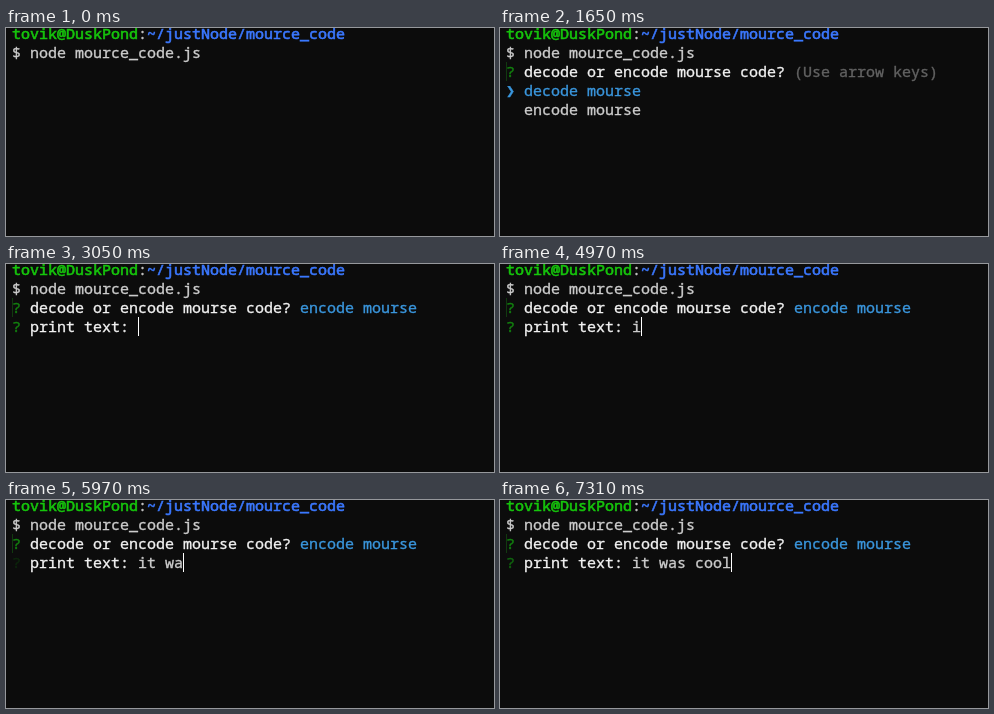
Recreate the animation shown at these times as an HTML page. Size 488 by 208 pixels, loop 8 s.

```html
<!DOCTYPE html>
<html lang="en">
<head>
<meta charset="utf-8">
<title>Terminal session</title>
<style>
  html, body { margin: 0; width: 100%; height: 100%; overflow: hidden; background: #0c0c0c; }

  /* Character grid: 9 x 19 px cells, first column at x = 6, first row at y = -4 */
  .term {
    position: relative; width: 488px; height: 208px; overflow: hidden;
    font: 400 15px/19px "Noto Sans Mono", "DejaVu Sans Mono", monospace;
    font-variant-ligatures: none; color: #ccc;
    -webkit-text-stroke: .35px; /* semi-bold look */
  }
  .term span {
    position: absolute; white-space: pre;
    left: calc(6px + 9px * var(--c, 0)); top: calc(-4px + 19px * var(--r, 0));
  }
  .term i { position: absolute; width: 1px; height: 19px; }
  .term b { font-weight: 400; -webkit-text-stroke-width: .6px; }
  .user { color: #16c60c; }
  .path { color: #3b78ff; }
  .mark { color: #13820f; }
  .ask { color: #f2f2f2; }
  .hint { color: #626262; }
  .pick { color: #3a96dd; }

  .anim { animation: 8s step-end infinite; }
  .question { animation-name: question; }
  .first { animation-name: first; }
  .second { animation-name: second; }
  .reply { animation-name: reply; }
  .blink { animation-name: reply, flicker; animation-duration: 8s; }
  .typed { overflow: hidden; width: 0; animation-name: type; }
  .caret { background: #fff; animation-name: caret; }
  .trace { left: 6px; top: 34px; background: #123a10; animation-name: trace; }
  .pointer { position: absolute; left: 0; top: 0; animation-name: pointer; }

  @keyframes question {
    0% { visibility: hidden; } 20.625% { visibility: visible; }
    33.875% { visibility: hidden; } 34.625%, 100% { visibility: visible; }
  }
  @keyframes first {
    0% { visibility: hidden; } 20.625% { visibility: visible; } 33.875%, 100% { visibility: hidden; }
  }
  @keyframes second {
    0% { visibility: hidden; } 34.625% { visibility: visible; } 38.125%, 100% { visibility: hidden; }
  }
  @keyframes reply {
    0% { visibility: hidden; } 38.125%, 100% { visibility: visible; }
  }
  @keyframes trace {
    0% { visibility: hidden; } 20.625%, 100% { visibility: visible; }
  }
  @keyframes flicker {
    0%, 65.5%, 68%, 73%, 76.25% { color: #13820f; }
    64.625%, 67.125%, 72.125%, 74.625%, 90.375% { color: #0d260c; }
    91.375%, 100% { color: #10660f; }
  }
  @keyframes type {
    0% { width: 0; }
    62.125% { width: 9px; }
    64.625% { width: 18px; }
    67.125% { width: 27px; }
    72.125% { width: 36px; }
    74.625% { width: 45px; }
    76.25% { width: 54px; }
    79.625% { width: 63px; }
    82.875% { width: 72px; }
    86.25% { width: 81px; }
    87.875% { width: 90px; }
    90.375%, 100% { width: 99px; }
  }
  @keyframes caret {
    0% { left: 204px; top: 15px; visibility: hidden; }
    6% { left: 204px; top: 15px; visibility: visible; }
    15.75% { left: 6px; top: 34px; visibility: visible; }
    20.625% { left: 6px; top: 34px; visibility: hidden; }
    38.125% { left: 132px; top: 53px; visibility: visible; }
    62.125% { left: 141px; top: 53px; }
    64.625% { left: 150px; top: 53px; }
    67.125% { left: 159px; top: 53px; }
    72.125% { left: 168px; top: 53px; }
    74.625% { left: 177px; top: 53px; }
    76.25% { left: 186px; top: 53px; }
    79.625% { left: 195px; top: 53px; }
    82.875% { left: 204px; top: 53px; }
    86.25% { left: 213px; top: 53px; }
    87.875% { left: 222px; top: 53px; }
    90.375%, 100% { left: 231px; top: 53px; visibility: visible; }
  }
  @keyframes pointer {
    0% { transform: translate(424px, 189px); visibility: hidden; }
    .875% { transform: translate(424px, 189px); visibility: visible; }
    1.75% { transform: translate(416px, 160px); }
    2.5% { transform: translate(410px, 140px); }
    3.375% { transform: translate(408px, 132px); visibility: visible; }
    16.5%, 100% { transform: translate(408px, 132px); visibility: hidden; }
  }
</style>
</head>
<body>
<div class="term">
  <span><b class="user">tovik@DuskPond</b>:<b class="path">~/justNode/mource_code</b></span>
  <span style="--r:1">$ node mource_code.js</span>

  <span class="mark anim question" style="--r:2">?</span>
  <span class="ask anim question" style="--r:2;--c:2">decode or encode mourse code?</span>
  <span class="hint anim first" style="--r:2;--c:32">(Use arrow keys)</span>
  <span class="pick anim reply" style="--r:2;--c:32">encode mourse</span>

  <span class="pick anim first" style="--r:3">❯</span>
  <span class="pick anim first" style="--r:3;--c:2">decode mourse</span>
  <span class="anim first" style="--r:4;--c:2">encode mourse</span>

  <span class="anim second" style="--r:3;--c:2">decode mourse</span>
  <span class="pick anim second" style="--r:4">❯</span>
  <span class="pick anim second" style="--r:4;--c:2">encode mourse</span>

  <span class="mark anim blink" style="--r:3">?</span>
  <span class="ask anim reply" style="--r:3;--c:2">print text:</span>
  <span class="anim typed" style="--r:3;--c:14">it was cool</span>

  <i class="anim trace"></i>
  <i class="anim caret"></i>
  <svg class="anim pointer" width="10" height="16" fill="none" stroke="#fff">
    <path d="M1 .5H4M5 .5H8M4.5 1V15M1 15.5H4M5 15.5H8"/>
  </svg>
</div>
</body>
</html>
```
